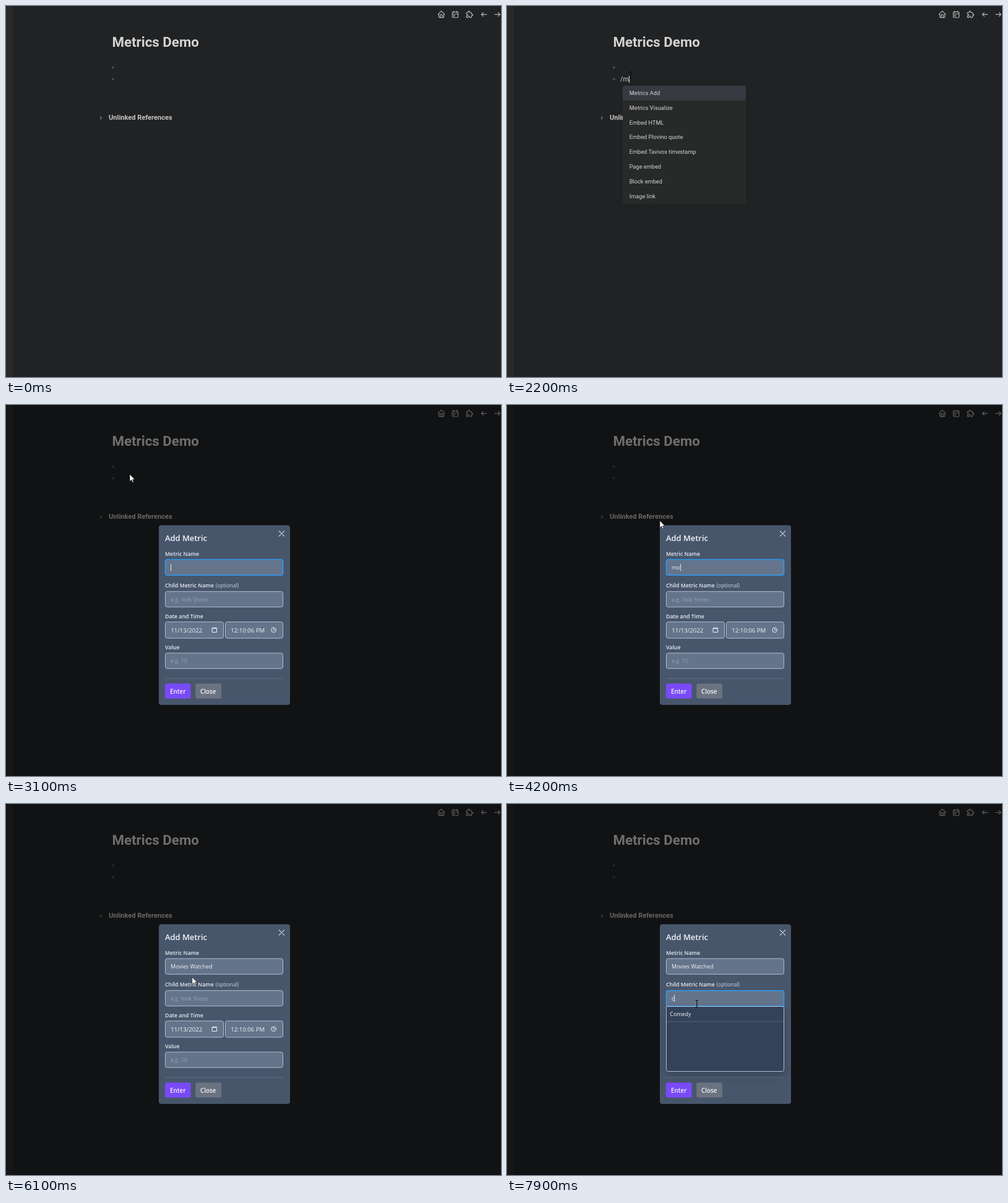
An HTML page for the animation above (8000 ms loop, 800 by 600 pixels).

```html
<!DOCTYPE html>
<html lang="en">
<head>
<meta charset="utf-8">
<title>Metrics Demo</title>
<style>
  html, body { margin: 0; width: 100%; height: 100%; overflow: hidden; background: #212224; }
  svg { display: block; width: 800px; height: 600px; }
  text { white-space: pre; }
  .page { font-family: Roboto, sans-serif; fill: #d2d2d1; }
  .form { font-family: "Open Sans", "Noto Sans", sans-serif; font-size: 8.9px; fill: #f1f5f9; }
  .b { font-weight: 600; }
  .label { font-weight: 600; font-size: 8.8px; fill: #e8edf3; }
  .hint { fill: #94a3b8; }
  .time { font-size: 9.6px; }
  .btn { font-weight: 600; font-size: 9.8px; }
  .field { fill: #64748b; stroke: #b3bdcb; }
  .field.on { stroke: #2e9bf0; stroke-width: 1.6; }
  .list { filter: drop-shadow(0 6px 7px #0003); }
  .icons path, .line { fill: none; stroke-linecap: round; stroke-linejoin: round; }
  .caret { stroke: #e6e6e6; stroke-width: 1; }
</style>
</head>
<body>
<svg viewBox="0 0 800 600">
  <rect width="800" height="600" fill="#212224"/>
  <rect width="11" height="600" fill="#282a29"/>
  <g class="icons" stroke="#b6b6b6" stroke-width="2">
    <path transform="translate(696.6 6.4) scale(.58)" d="M5 12H3l9-9 9 9h-2M5 12v7a2 2 0 0 0 2 2h10a2 2 0 0 0 2-2v-7M9 21v-6a2 2 0 0 1 2-2h2a2 2 0 0 1 2 2v6"/>
    <path transform="translate(719 6.6) scale(.58)" d="M6 5h12a2 2 0 0 1 2 2v12a2 2 0 0 1-2 2H6a2 2 0 0 1-2-2V7a2 2 0 0 1 2-2zM16 3v4M8 3v4M4 11h16M8 15h2v2H8z"/>
    <path transform="translate(742.4 6.4) scale(.58)" d="M4 7h3a1 1 0 0 0 1-1V5a2 2 0 0 1 4 0v1a1 1 0 0 0 1 1h3a1 1 0 0 1 1 1v3a1 1 0 0 0 1 1h1a2 2 0 0 1 0 4h-1a1 1 0 0 0-1 1v3a1 1 0 0 1-1 1h-3a1 1 0 0 1-1-1v-1a2 2 0 0 0-4 0v1a1 1 0 0 1-1 1H4a1 1 0 0 1-1-1v-3a1 1 0 0 1 1-1h1a2 2 0 0 0 0-4H4a1 1 0 0 1-1-1V8a1 1 0 0 1 1-1"/>
    <path transform="translate(765.3 6.5) scale(.6)" d="M5 12h14M5 12l5 5M5 12l5-5"/>
    <path transform="translate(787 6.5) scale(.6)" d="M5 12h14M19 12l-5 5M19 12l-5-5"/>
  </g>
  <g class="page">
    <text x="171.5" y="66" font-size="22.3" font-weight="700">Metrics Demo</text>
    <text x="166" y="184.3" font-size="11.05" font-weight="700" fill="#c4c4c3">Unlinked References</text>
    <text id="block" x="183" y="122" font-size="10.7"></text>
  </g>
  <g fill="#494b4c">
    <circle cx="172.7" cy="99.5" r="2"/>
    <circle cx="172.7" cy="118.5" r="2"/>
    <path fill="#5b5c5d" d="M152 177.6l3.8 3.4-3.8 3.4z"/>
  </g>
  <path id="blockCaret" class="caret"/>
  <g id="menu" class="page" font-size="9.2"></g>

  <g id="modal">
    <rect width="800" height="600" opacity=".48"/>
    <rect x="247" y="194.5" width="212" height="290.5" rx="4" fill="#48566c"/>
    <path class="line" d="M441.3 203.8l8.4 8.4M449.7 203.8l-8.4 8.4" stroke="#d5dce5" stroke-width="1.1"/>
    <g class="form">
      <text class="b" x="257" y="220" font-size="12.9" style="font-size:12.9px">Add Metric</text>
      <text class="label" x="257" y="244.3">Metric Name</text>
      <text class="label" x="257" y="295.3">Child Metric Name</text>
      <text x="338.8" y="295.3" style="font-size:8.4px" fill="#cbd5e1">(optional)</text>
      <text class="label" x="257" y="345.2">Date and Time</text>
      <text class="label" x="257" y="395.2">Value</text>
      <rect id="nameBox" class="field" x="257.5" y="250" width="190" height="25.3" rx="3"/>
      <rect id="childBox" class="field" x="257.5" y="301.7" width="190" height="25" rx="3"/>
      <rect class="field" x="257.5" y="350.8" width="94" height="26.4" rx="3"/>
      <rect class="field" x="354.5" y="350.8" width="93" height="26.4" rx="3"/>
      <rect class="field" x="257.5" y="401.2" width="190" height="25" rx="3"/>
      <text id="name" x="266" y="266.3"></text>
      <text id="child" x="266" y="318"></text>
      <text class="time" x="266.3" y="367.8">11/13/2022</text>
      <text class="time" x="363.3" y="367.8">12:10:06 PM</text>
      <text class="hint" x="266" y="417.2">e.g. 10</text>
      <g class="line" stroke="#eef2f6" stroke-width="1">
        <path d="M333.5 361h7v6.5h-7zM333.5 361.4h7M335 359.8v1M339 359.8v1"/>
        <circle cx="432.6" cy="363.8" r="3.8"/>
        <path d="M432.6 361.4v2.6h2"/>
      </g>
      <path d="M257 442.3h191" stroke="#617086"/>
      <rect x="257" y="450.5" width="41.6" height="24.3" rx="3" fill="#794af8"/>
      <rect x="306.2" y="450.5" width="41.8" height="24.3" rx="3" fill="#6b7280"/>
      <text class="btn" x="265" y="466.5">Enter</text>
      <text class="btn" x="314" y="466.5">Close</text>
      <g id="list" class="list">
        <path d="M257.5 0h190v102a3 3 0 0 1-3 3h-184a3 3 0 0 1-3-3z" fill="#334159"/>
        <rect id="listRow" x="257.5" width="190" height="24.5" fill="#475569"/>
        <path d="M258 24.5h189" stroke="#526077"/>
        <path d="M257.5 0h190v102a3 3 0 0 1-3 3h-184a3 3 0 0 1-3-3z" fill="none" stroke="#b3bdcb"/>
        <text id="listText" x="263.3" y="15.4"></text>
      </g>
    </g>
    <path id="formCaret" class="caret"/>
  </g>

  <g id="pointer">
    <path id="beam" class="line" stroke="#08090a" d="M-2-5.5h1.4L0-5 .6-5.5H2M0-5V5M-2 5.5h1.4L0 5l.6.5H2"/>
    <path id="arrow" fill="#fff" stroke="#111" stroke-width=".6" d="M0 0v11.6L2.7 9.1l1.8 4.1 1.8-.8-1.8-4H8z"/>
    <path id="hand" fill="#fff" stroke="#111" stroke-width=".7" d="M-1 8V1.2a1 1 0 0 1 2 0V5.6l4.4 1a1.5 1.5 0 0 1 1.2 1.6L6 11.8 5 14.6H0L-3.6 9.6a1 1 0 0 1 1.4-1.4z"/>
  </g>
</svg>
<script>
const $ = id => document.getElementById(id);
const LOOP = 8000;

// Each track is a list of [start time, value]
const at = (track, t) => track.filter(k => k[0] <= t).pop();

const blockKeys = [[0, ''], [500, ''], [1800, '/'], [2200, '/m'], [2400, '/me'], [2600, '/met']];
const nameKeys = [[0, ''], [3100, ''], [4000, 'm'], [4200, 'mo'], [4400, 'mov'], [4600, 'movi'], [5700, 'Movies Watched']];
const childKeys = [[0, ''], [7200, ''], [7700, 'c']];

const found = ['Metrics Add', 'Metrics Visualize', 'Embed HTML', 'Embed Plovino quote', 'Embed Tavivox timestamp'];
const commands = ['Page reference', 'Page embed', 'Block reference', 'Block embed', 'Link',
  'Image link', 'Underline', 'TODO', 'DOING', 'LATER'];
const menus = { '/': commands, '/m': [...found, 'Page embed', 'Block embed', 'Image link'], '/me': found, '/met': found };

const path = [[100, 430, 298], [450, 200, 112], [3300, 200, 112], [3800, 247, 187],
  [5000, 247, 187], [5300, 300.8, 280], [6300, 300.8, 280], [6900, 306.8, 323], [LOOP, 306.8, 323]];

function pointerAt(t) {
  const i = Math.max(1, path.findIndex(p => p[0] > t));
  const [t0, x0, y0] = path[i - 1], [t1, x1, y1] = path[i];
  const u = Math.min(1, Math.max(0, (t - t0) / (t1 - t0)));
  const e = u * u * (3 - 2 * u);
  return [x0 + (x1 - x0) * e, y0 + (y1 - y0) * e];
}

function show(id, on) { $(id).style.display = on ? '' : 'none'; }

function setText(id, s) { if ($(id).textContent !== s) $(id).textContent = s; }

function caret(id, field, y, h, since, t) {
  const x = Math.round(+$(field).getAttribute('x') + $(field).getComputedTextLength()) + .5;
  $(id).setAttribute('d', `M${x} ${y}v${h}`);
  show(id, (t - since) % 1000 < 500);
}

let menuKey = '';
function drawMenu(key) {
  show('menu', key);
  if (key === menuKey) return;
  menuKey = key;
  const rows = menus[key] || [], row = 23.8;
  const height = rows.length > 9 ? 245 : rows.length * row;
  $('menu').innerHTML = `<rect x="187" y="129" width="199" height="${height}" rx="3" fill="#282a2a"/>
    <rect x="187" y="129" width="199" height="24" rx="3" fill="#373a40"/>` +
    rows.map((s, i) => `<text x="197.8" y="${144 + i * row}">${s}</text>`).join('');
}

function drawField(id, keys, hint, t) {
  const value = at(keys, t)[1];
  setText(id, value || hint);
  $(id).classList.toggle('hint', !value);
}

function draw(t) {
  const modal = t >= 2900;
  const [blockTime, typed] = at(blockKeys, t);
  const command = modal ? '' : typed;
  setText('block', command);
  drawMenu(command);
  show('blockCaret', false);
  if (!modal && t >= 500) caret('blockCaret', 'block', 113, 11, blockTime, t);

  show('modal', modal);
  if (modal) {
    const onName = t >= 3100 && t < 5700, onChild = t >= 7200;
    drawField('name', nameKeys, '', t);
    drawField('child', childKeys, 'e.g. Velk Shoes', t);
    $('nameBox').classList.toggle('on', onName);
    $('childBox').classList.toggle('on', onChild);
    show('formCaret', false);
    if (onName) caret('formCaret', 'name', 257, 11.5, at(nameKeys, t)[0], t);
    if (onChild) {
      const [since, value] = at(childKeys, t);
      if (value) caret('formCaret', 'child', 308.5, 11.5, since, t);
      else {
        $('formCaret').setAttribute('d', 'M266.5 308.5v11.5');
        show('formCaret', (t - since) % 1000 < 500);
      }
    }
    const nameList = t >= 4500 && t < 5700, childList = t >= 7800;
    show('list', nameList || childList);
    $('list').setAttribute('transform', `translate(0 ${childList ? 327.5 : 275.8})`);
    setText('listText', childList ? 'Comedy' : 'Movies Watched');
    show('listRow', nameList && t >= 5200);
  }

  const [x, y] = pointerAt(t);
  const hand = t >= 5200 && t < 5700;
  const beam = modal ? y > 302 : y < 128;
  show('pointer', t >= 100);
  $('pointer').setAttribute('transform', `translate(${x} ${y})`);
  show('hand', hand);
  show('beam', beam);
  show('arrow', !hand && !beam);
}

const start = performance.now();
function tick() {
  draw((performance.now() - start) % LOOP);
  requestAnimationFrame(tick);
}
tick();
</script>
</body>
</html>
```
